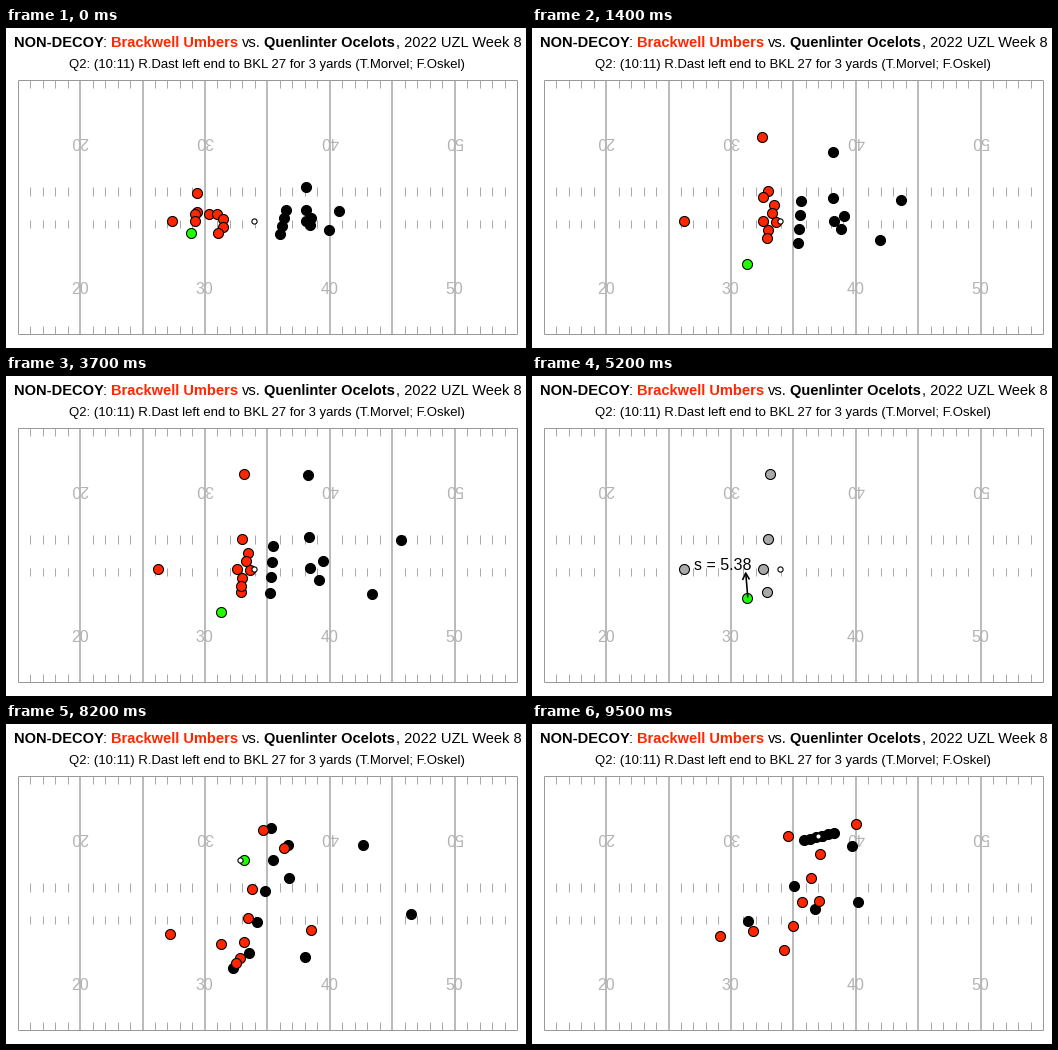
These frames come from a looping animation (520x320 px, 10 s). A matplotlib script:

```python
import numpy as np
import matplotlib.pyplot as plt
from matplotlib.animation import FuncAnimation

W, H, DPI = 520, 320, 80
PX = 72 / DPI
RED, GREEN, GRAY = "#ff2600", "#1eff00", "#a9a9a9"
EDGE, LINE, LABEL = "#999999", "#b0b0b0", "#b3b3b3"
LEFT, RIGHT, TOP, BOTTOM = 12.2, 511.5, 53, 307
YARD = (RIGHT - LEFT) / 40

PAUSE, HOLD = 52, 20                     # step of the pause, its length in frames
SNAP, BREAK, END = 53, 63, 76            # steps of the play
BALL_SPOT = np.array([248.7, 194])


def smooth(u):
    u = np.clip(u, 0, 1)
    return u * u * (3 - 2 * u)


def curve(keys):
    """Return step -> (x, y): a monotone cubic through {step: point}."""
    t = np.array(sorted(keys), float)
    p = np.array([keys[k] for k in sorted(keys)], float)
    slope = np.diff(p, axis=0) / np.diff(t)[:, None]
    a, b = slope[:-1], slope[1:]
    same = a * b > 0
    inner = np.where(same, 2 * a * b / np.where(same, a + b, 1), 0)
    tangent = np.vstack([slope[:1], inner, slope[-1:]])

    def at(step):
        i = int(np.clip(np.searchsorted(t, step, "right") - 1, 0, len(t) - 2))
        h = t[i + 1] - t[i]
        u = (step - t[i]) / h
        return (p[i] + (p[i + 1] - p[i]) * smooth(u)
                + h * u * (1 - u) * (tangent[i] * (1 - u) - tangent[i + 1] * u))
    return at


def route(huddle, points, settle, leave=SNAP, arrive=SNAP):
    """Huddle, line up, optionally shift before the snap, then break and end."""
    first, lined_up, target, final = points[0], points[-3], points[-2], points[-1]
    return curve({0: huddle, settle: first, leave: first, arrive: lined_up,
                  SNAP: lined_up, BREAK: target, END: final})


def gather(spot, point, middle, scale):
    """Huddle place: the formation shrunk around a spot."""
    return np.array(spot) + scale * (np.array(point) - middle)


def skill(*points, settle=12, **shift):
    return route(gather((190, 192), points[0], (232, 190), 0.29),
                 points, settle, **shift)


def cover(*points, **shift):
    return route(gather((303, 188), points[0], (310, 178), 0.36),
                 points, 30, **shift)


def blocker(i):
    angle = np.radians(45 * i - 115)
    huddle = 208 + 10.5 * np.cos(angle), 196 + 10.5 * np.sin(angle)
    lined_up = 242 - 1.7 * i + 6 * (i == 2), 177.5 + 8.3 * i
    target = 246 - 4 * i, 166 + 74 * np.sin(i * np.pi / 8)
    return route(huddle, (lined_up, target, (288 - 9 * i, 131 + 24 * i)), 12)


def rusher(i, final):
    return route((280 - 2 * i, 183 + 8 * i),
                 ((267 - i, 171 + 15.5 * i), (267 - 8 * i, 137 + 31 * i), final), 22)


def pile(i):
    """Place number i in the heap of tacklers, left to right."""
    return 272 + 6 * i, 117 - 1.5 * i


eligible = [
    skill((238, 99), (257, 107), (256, 113), settle=20),
    skill((236, 164), (278, 125), (324, 101)),
    skill((231, 170), (235, 217), (305, 207), (287, 178), leave=14, arrive=24),
    skill((231, 194), (164, 211), (188, 213)),
    skill((152, 194), (215, 221), (221, 208)),
]
offense = eligible + [blocker(i) for i in range(5)]
defense = [rusher(i, final)
           for i, final in enumerate((pile(2), pile(3), pile(0), (262, 163)))]
defense += [
    cover((302, 100), (265, 105), pile(1)),
    cover((303, 162), (290, 158), (282, 122), pile(5), leave=38),
    cover((317, 186), (309, 185), (283, 155), pile(4), leave=38),
    cover((304, 193), (308, 197), (299, 234), (283, 186), leave=38),
    cover((395, 165), (397, 156), (357, 122), (320, 123), leave=38),
    cover((366, 219), (393, 221), (405, 191), (326, 179), leave=38),
    cover((313, 205), (291, 233), (227, 245), (216, 198), leave=38),
]
runner = skill((215, 236.5), (216, 219), (238, 137), pile(3), leave=45)


def ball(step):
    carried = runner(step) - (4, 0)
    return BALL_SPOT + (carried - BALL_SPOT) * smooth((step - PAUSE) / 6)


fig = plt.figure(figsize=(W / DPI, H / DPI), dpi=DPI, facecolor="white")
ax = fig.add_axes([0, 0, 1, 1])
ax.set(xlim=(0.5, W + 0.5), ylim=(H + 0.5, 0.5))
ax.axis("off")


def write(x, y, text, size, color="black", **kw):
    return ax.text(x, y, text, fontsize=size * PX, color=color,
                   family="Liberation Sans", va="baseline", **kw)


def stroke(xs, ys, color, width, z=1):
    return ax.plot(xs, ys, color=color, lw=width * PX, zorder=z,
                   solid_capstyle="butt")[0]


def dots(color, radius, z):
    return ax.scatter([], [], s=(2 * radius * PX) ** 2, c=color,
                      edgecolors="black", linewidths=1.1 * PX, zorder=z)


# titles
for x, text, color, weight in (
        (8.4, "NON-DECOY", "black", "bold"),
        (97.4, ":", "black", "normal"),
        (105.4, "Brackwell Umbers", RED, "bold"),
        (236.4, "vs.", "black", "normal"),
        (258.6, "Quenlinter Ocelots", "black", "bold"),
        (390.4, ", 2022 UZL Week 8", "black", "normal")):
    write(x, 19.9, text, 14.58, color, weight=weight)
write(63.4, 40.3, "Q2: (10:11) R.Dast left end to BKL 27 for 3 yards "
      "(T.Morvel; F.Oskel)", 13.15)

# field
for yard in range(41):
    x = LEFT + yard * YARD
    if yard % 5:
        for y0, y1 in ((TOP, 61), (160, 168.5), (192.5, 201), (299, BOTTOM)):
            stroke([x, x], [y0, y1], GRAY, 1)
    elif yard in (0, 40):
        stroke([x, x], [TOP, BOTTOM], EDGE, 1)
    else:
        stroke([x, x], [TOP, BOTTOM], LINE, 1.7)
for y in (TOP, BOTTOM):
    stroke([LEFT, RIGHT], [y, y], EDGE, 1)
for number in (20, 30, 40, 50):
    x = LEFT + (number - 15) * YARD - 0.3
    write(x, 266.5, str(number), 16, LABEL, ha="center")
    write(x, 109.3, str(number), 16, LABEL, ha="center", rotation=180,
          rotation_mode="anchor")

green_dot = dots(GREEN, 5, 3)
black_dots = dots("black", 5, 4)
red_dots = dots(RED, 5, 5)
ball_dot = dots("white", 2.6, 6)

speed = [write(162.8, 195, "s = 5.38", 16, zorder=8),
         stroke([216.3, 214.3], [222, 198], "black", 1.6, 7),
         stroke([211, 214.2, 218], [204.5, 197.5, 204], "black", 1.6, 7)]


def update(frame):
    paused = PAUSE <= frame < PAUSE + HOLD
    step = min(frame, PAUSE) if frame < PAUSE + HOLD else min(frame - HOLD + 1, END)
    for group, tracks in ((red_dots, eligible if paused else offense),
                          (black_dots, defense),
                          (green_dot, [runner]),
                          (ball_dot, [ball])):
        group.set_offsets([track(step) for track in tracks])
    red_dots.set_facecolor(GRAY if paused else RED)
    black_dots.set_visible(not paused)
    for artist in speed:
        artist.set_visible(paused)
    return [red_dots, black_dots, green_dot, ball_dot, *speed]


anim = FuncAnimation(fig, update, frames=100, interval=100, repeat=True,
                     repeat_delay=0, blit=False)
plt.show()
```
